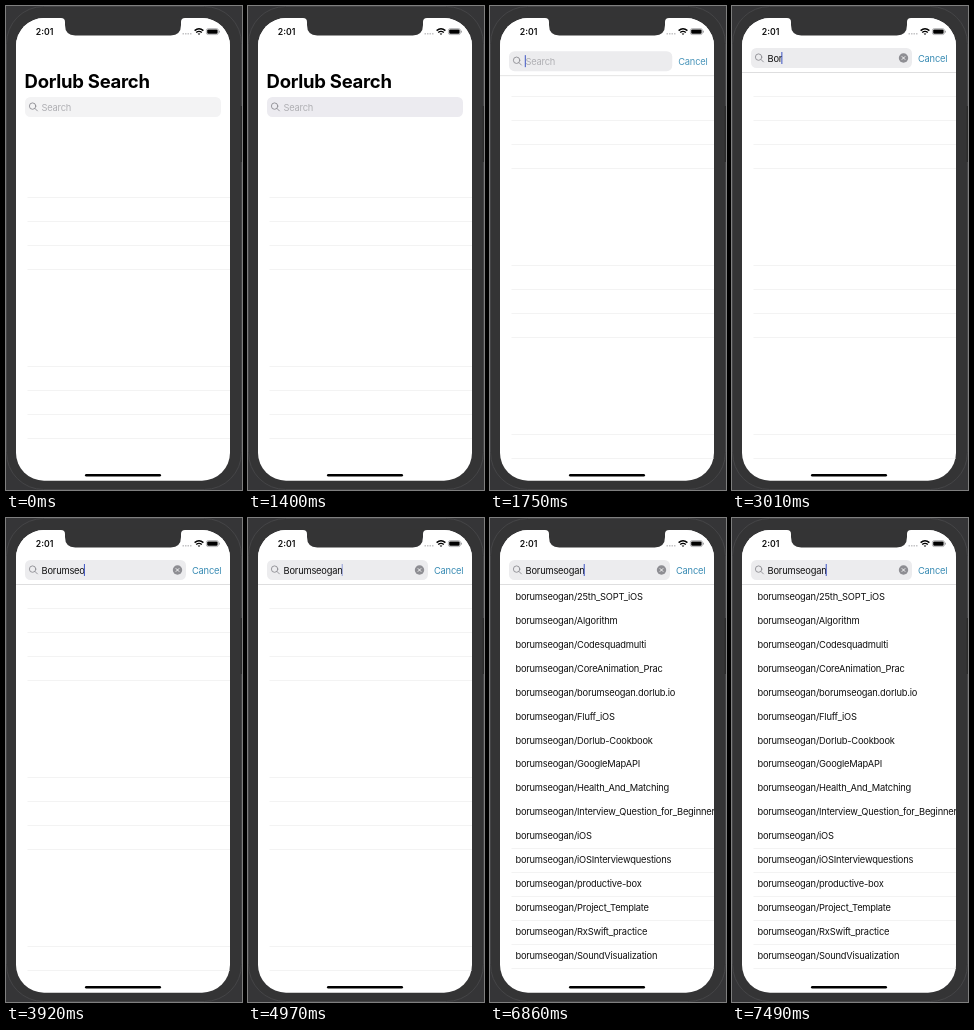
Animation, 236 px wide and 484 px high, one loop 8 s. Source, as an HTML page:

```html
<!DOCTYPE html>
<html lang="en">
<head>
<meta charset="utf-8">
<title>Search</title>
<style>
  html, body { margin: 0; width: 100%; height: 100%; overflow: hidden; background: #353537; }
  svg { display: block; width: 236px; height: 484px; }
  text { font: 400 9.3px Inter, "Liberation Sans", sans-serif; letter-spacing: -.2px; fill: #111; white-space: pre; }
  #title { font-size: 18.5px; font-weight: 700; letter-spacing: -.27px; fill: #000; }
  #clock { font-size: 8.7px; font-weight: 600; letter-spacing: 0; }
  #hint { fill: #b0b0b4; }
  #cancel { fill: #3a8cb4; }
  .line { fill: #f3f3f3; }
</style>
</head>
<body>
<svg viewBox="0 0 236 484">
  <defs>
    <clipPath id="screen"><rect x="10" y="12" width="214" height="462.7" rx="28"/></clipPath>
  </defs>
  <rect x=".5" y=".5" width="235" height="483" rx="37" fill="#343435" stroke="#454547"/>
  <rect x="234.5" y="100" width="1.5" height="56" fill="#2c2c2d"/>

  <g clip-path="url(#screen)">
    <rect x="10" y="12" width="214" height="463" fill="#fff"/>
    <g id="lines"></g>
    <g id="list"></g>

    <g id="nav">
      <rect x="10" y="0" width="214" height="115" fill="#fff"/>
      <rect id="divider" x="10" y="115" width="214" height="1" fill="#dededf"/>
      <text id="title" x="18.6" y="82">Dorlub Search</text>
      <rect id="bar" x="19" y="91" height="20" rx="5.5"/>
      <g fill="none" stroke="#8e8e93" stroke-width=".9" stroke-linecap="round">
        <circle cx="26.6" cy="100.1" r="3.2"/>
        <path d="M29 102.5l2.4 2.4"/>
      </g>
      <text id="hint" x="35.4" y="104.6">Search</text>
      <text id="query" x="35.6" y="104.6"></text>
      <rect id="caret" y="95" width="1" height="12" fill="#3d55c4"/>
      <g id="clear">
        <circle cx="171.5" cy="101" r="4.7" fill="#8e8e93"/>
        <path d="M169.8 99.3l3.4 3.4m0-3.4l-3.4 3.4" stroke="#fff" stroke-width=".9"/>
      </g>
      <text id="cancel" y="104.6">Cancel</text>
    </g>

    <text id="clock" x="29.8" y="28.8">2:01</text>
    <path d="M176.5 27.7h9" stroke="#c4c4c6" stroke-width="1.4" stroke-dasharray="1.5 1"/>
    <g fill="none" stroke="#000" stroke-width="1.4">
      <path d="M188.6 24.6q4.4-3.8 8.8 0M190.2 26.5q2.8-2.3 5.6 0"/>
      <path d="M191.6 27.6h2.8l-1.4 1.5z" fill="#000" stroke="none"/>
    </g>
    <rect x="200.4" y="22.6" width="12" height="6" rx="1.8" fill="none" stroke="#9a9a9c" stroke-width=".7"/>
    <rect x="201.2" y="23.4" width="10.4" height="4.4" rx="1.1"/>
    <rect x="213" y="24.7" width=".9" height="1.9" fill="#9a9a9c"/>
    <rect x="79" y="468" width="76" height="2.5" rx="1.25"/>
  </g>
  <path d="M55 11.5h124v.6q-4 0-4 4v3q0 10.3-10.3 10.3H69.3Q59 29.4 59 19.1v-3q0-4-4-4z" fill="#343435"/>
</svg>
<script>
const LOOP = 8000, STEP = 70;
const NAME = 'Borumseogan';
const REPOS = ['25th_SOPT_iOS', 'Algorithm', 'Codesquadmulti', 'CoreAnimation_Prac',
  'borumseogan.dorlub.io', 'Fluff_iOS', 'Dorlub-Cookbook', 'GoogleMapAPI',
  'Health_And_Matching', 'Interview_Question_for_Beginner', 'iOS', 'iOSInterviewquestions',
  'productive-box', 'Project_Template', 'RxSwift_practice', 'SoundVisualization'];
const KEYS = [2520, 2870, 3010, 3150, 3220, 3290, 3570, 3920, 4060, 4200, 4340];
const BLINKS = [[2100, 2520], [4970, 5250], [5950, 6300], [7070, 7350]];
const SLIDE = { start: 1487, length: 320 };

const $ = id => document.getElementById(id);
const clamp = v => Math.min(1, Math.max(0, v));
const set = (id, attrs) => {
  for (const key in attrs) $(id).setAttribute(key, attrs[key]);
};
const add = (parent, tag, attrs, text = '') => {
  const el = document.createElementNS('http://www.w3.org/2000/svg', tag);
  for (const key in attrs) el.setAttribute(key, attrs[key]);
  el.textContent = text;
  $(parent).append(el);
};
const addLine = (parent, y) =>
  add(parent, 'rect', { class: 'line', x: 21.5, y: Math.round(y), width: 203, height: 1 });

// Empty table: four visible separators in every seven rows
for (let k = 0; k < 16; k++) {
  if (k % 7 < 4) addLine('lines', 90 + k * 24.14);
}
// Filled table: separators show only under the lower rows
REPOS.forEach((repo, i) => {
  add('list', 'text', { x: 25.4, y: 81.7 + i * 23.97 }, `${NAME.toLowerCase()}/${repo}`);
  if (i >= 10) addLine('list', 90 + i * 23.97);
});

// Cubic Bezier (.42, 0, .58, 1)
function easeInOut(x) {
  let lo = 0, hi = 1;
  for (let i = 0; i < 20; i++) {
    const s = (lo + hi) / 2;
    const bx = 3 * s * (1 - s) * (.42 * (1 - s) + .58 * s) + s ** 3;
    if (bx < x) lo = s; else hi = s;
  }
  return lo * lo * (3 - 2 * lo);
}

function caretAlpha(t) {
  if (t < 1540) return 0;
  return BLINKS.reduce((a, [out, back]) =>
    t < out ? a : Math.max(clamp(1 - (t - out + STEP) / 140), clamp((t - back + STEP) / (out < 2500 ? 70 : 210))), 1);
}

function render(t) {
  const p = easeInOut(clamp((t - SLIDE.start) / SLIDE.length));
  const right = 215 - 35 * p;
  const typed = KEYS.filter(k => t >= k).length;
  const loaded = t >= 6860;

  set('nav', { transform: `translate(0 ${-49 * p})` });
  set('lines', { transform: `translate(0 ${t < 1540 ? 101 : 0})`, opacity: loaded ? 0 : 1 });
  set('list', { opacity: loaded ? 1 : 0 });
  set('title', { opacity: clamp(1 - p * 2.95) });
  set('divider', { opacity: p ** 3 });
  set('bar', { width: right - 19, fill: t < 1400 ? '#f3f3f4' : t < 1680 ? '#ecebf0' : '#ececee' });
  set('cancel', { x: right + 6, opacity: p ** 1.3 });
  set('hint', { opacity: typed ? 0 : 1 });
  set('clear', { opacity: t < 2520 ? 0 : t < 2730 ? .5 : 1 });

  $('query').textContent = NAME.slice(0, typed);
  const end = typed ? $('query').getComputedTextLength() : 0;
  set('caret', { x: 34.8 + end, opacity: caretAlpha(t) });
}

function tick() {
  const t = performance.now() % LOOP;
  render(Math.floor(t / STEP) * STEP);
  requestAnimationFrame(tick);
}
tick();
</script>
</body>
</html>
```
